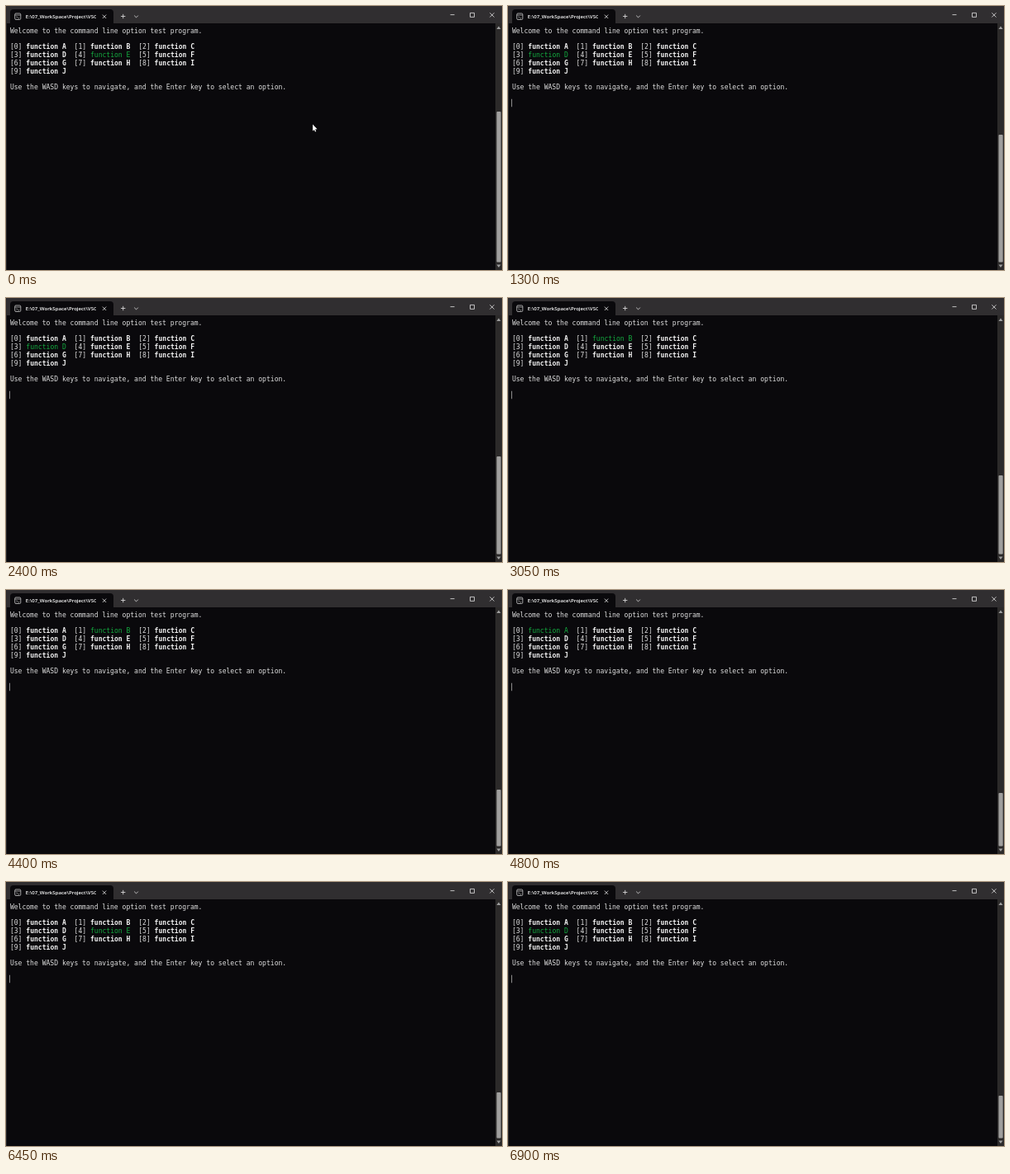
Animation, 600 px wide and 320 px high, one loop 7000 ms. Source, as an HTML page with a canvas:

```html
<!DOCTYPE html>
<html lang="en">
<head>
<meta charset="utf-8">
<title>Command line options</title>
<style>
html, body { margin: 0; width: 100%; height: 100%; overflow: hidden; background: #0a090c; }
canvas { display: block; }
</style>
</head>
<body>
<canvas id="stage" width="600" height="320"></canvas>
<script>
const ctx = document.getElementById('stage').getContext('2d');
const LOOP = 7000;
const FOCUS = 900, CLICK_END = 1100, TYPING = 1300;
const CELL = 4.853, LINE = 9.72, LEFT = 4.9, FIRST_BASELINE = 33;
const MONO = '8.06px "DejaVu Sans Mono", monospace';
const BACKGROUND = '#0a090c';

// time, selected option, top of the scroll thumb, message under the menu
const states = [
  [0, 'E', 128], [1300, 'D', 156], [1900, 'G', 177], [2400, 'D', 192],
  [2700, 'A', 205], [3000, 'B', 215], [3300, 'C', 224], [3650, 'F', 232],
  [4000, 'E', 236], [4400, 'B', 242], [4700, 'A', 246],
  [5200, 'A', 246, 'Function A called.'], [5600, 'B', 251],
  [6100, 'B', 251, 'Function B called.'], [6400, 'E', 255], [6800, 'D', 259]
];

function rect(x, y, w, h, color, radius = 0) {
  ctx.fillStyle = color;
  ctx.beginPath();
  ctx.roundRect(x, y, w, h, radius);
  ctx.fill();
}

function polygon(points, color) {
  ctx.fillStyle = color;
  ctx.beginPath();
  points.forEach(([x, y]) => ctx.lineTo(x, y));
  ctx.fill();
}

function stroke(path, color = '#e4e4e4', width = 0.8) {
  ctx.strokeStyle = color;
  ctx.lineWidth = width;
  ctx.stroke(new Path2D(path));
}

function print(text, column, row, color = '#dedede', bold = false) {
  ctx.font = (bold ? 'bold ' : '') + MONO;
  ctx.fillStyle = color;
  ctx.fillText(text, LEFT + column * CELL, FIRST_BASELINE + row * LINE);
}

function drawTitleBar() {
  rect(0, 0, 600, 21, '#302e30');
  rect(5, 4, 125, 18, BACKGROUND, [4, 4, 0, 0]);

  stroke('M12 9h4.5q1.3 0 1.3 1.3v4.9q0 1.3-1.3 1.3h-4.5q-1.3 0-1.3-1.3v-4.9q0-1.3 1.3-1.3z', '#c8c8c8');
  stroke('M10.7 11h7.1M12.5 12.4l1.2 1.1-1.2 1.1M14.3 14.8h2', '#c8c8c8', 0.7);

  ctx.save();
  ctx.beginPath();
  ctx.rect(23, 5, 86, 15);
  ctx.clip();
  ctx.font = '600 6.1px "Open Sans", sans-serif';
  ctx.fillStyle = '#ffffff';
  ctx.fillText('E:\\07_WorkSpace\\Project\\VSC', 23.8, 15);
  ctx.restore();

  stroke('M116.8 10.6l4.4 4.4M121.2 10.6l-4.4 4.4');
  stroke('M139 12.5h5.4M141.7 9.8v5.4');
  stroke('M155.2 11.6l2.3 2.3 2.3-2.3');
  stroke('M537.5 10.6h5');
  stroke('M561.5 8.4h5v5h-5z');
  stroke('M585.3 8.3l5.2 5.2M590.5 8.3l-5.2 5.2');
}

function drawScrollBar(thumbTop) {
  rect(592, 21, 8, 299, '#2c2a2a');
  polygon([[593.5, 28], [596, 24.5], [598.5, 28]], '#a0a0a0');
  polygon([[593.5, 313.5], [596, 317], [598.5, 313.5]], '#a0a0a0');
  rect(593.5, thumbTop, 5.2, 310.5 - thumbTop, '#a09f9e', 1);
}

function drawMenu(selected) {
  print('Welcome to the command line option test program.', 0, 0);
  [...'ABCDEFGHIJ'].forEach((name, i) => {
    const column = i % 3 * 16, row = 2 + Math.floor(i / 3);
    const active = name === selected;
    print(`[${i}]`, column, row);
    print('function ' + name, column + 4, row, active ? '#14ac40' : '#f2f2f2', !active);
  });
  print('Use the WASD keys to navigate, and the Enter key to select an option.', 0, 7);
}

function drawPointer(clicked) {
  if (clicked) {
    ctx.fillStyle = 'rgba(255, 255, 0, 0.47)';
    ctx.beginPath();
    ctx.ellipse(370.5, 143, 5.3, 5, 0, 0, Math.PI * 2);
    ctx.fill();
  }
  polygon([[371, 143.5], [371, 151.5], [372.8, 150], [374, 152.6],
    [375.2, 152], [374, 149.4], [376.5, 149.2]], '#ffffff');
}

function draw(time) {
  const [, selected, thumbTop, message] = states.findLast(([start]) => time >= start);
  rect(0, 0, 600, 320, BACKGROUND);
  drawTitleBar();
  drawMenu(selected);
  if (message) print(message, 0, 9);
  if (time >= FOCUS) rect(4, message ? 122.5 : 112.7, 1, 9.6, '#8c8c8c');
  drawScrollBar(thumbTop);
  rect(0, 0, 1, 320, '#2c2b2d');
  if (time < TYPING) drawPointer(time >= FOCUS && time < CLICK_END);
}

const startTime = performance.now();
function tick() {
  draw((performance.now() - startTime) % LOOP);
  requestAnimationFrame(tick);
}
tick();
</script>
</body>
</html>
```
